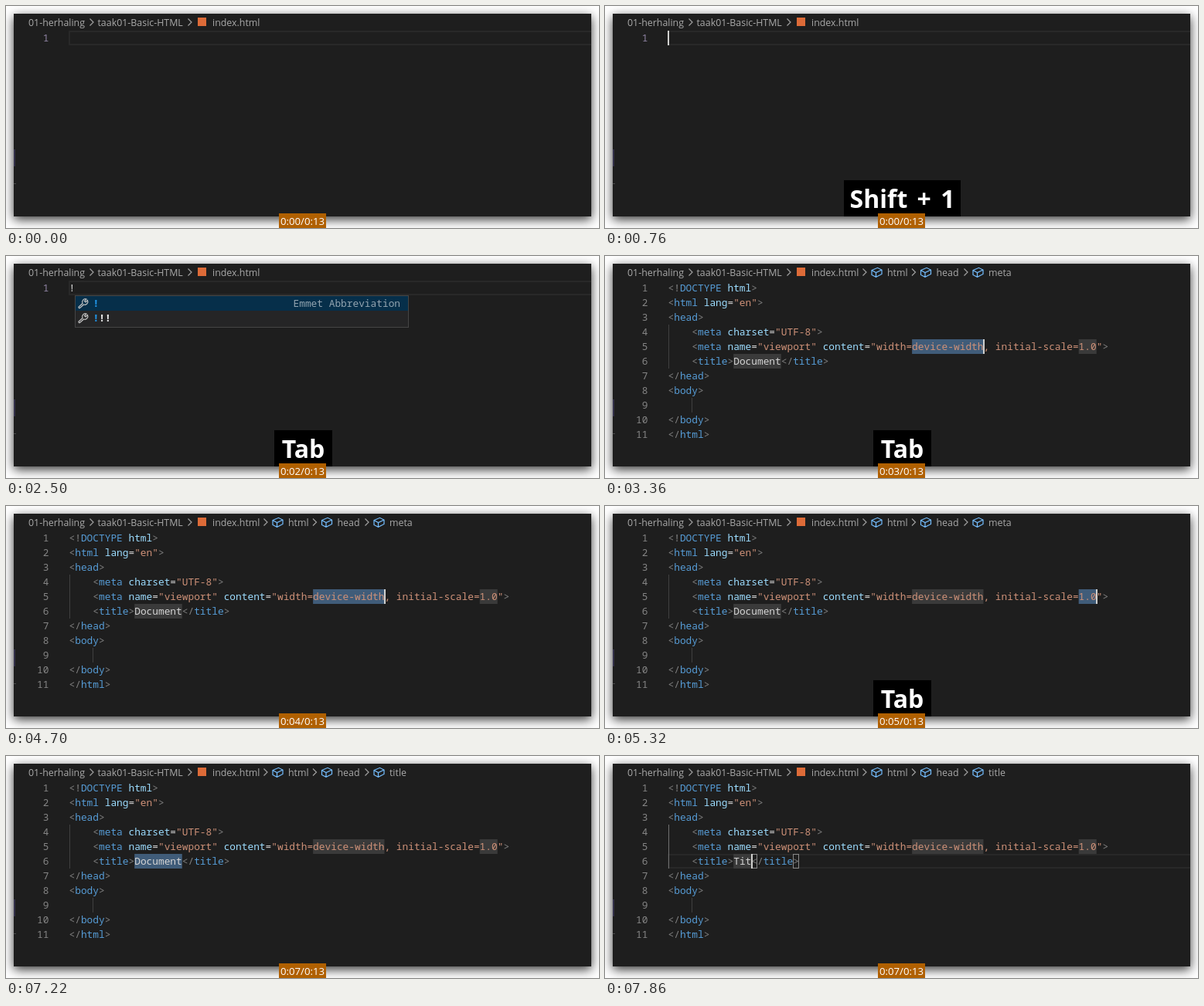
These frames come from a looping animation (767 by 288 pixels, 8000 ms). An HTML page with a canvas:

```html
<!DOCTYPE html>
<html lang="en">
<head>
<meta charset="UTF-8">
<title>Editor demo</title>
<style>
html, body { margin: 0; width: 100%; height: 100%; overflow: hidden; background: #fff; }
canvas { display: block; }
</style>
</head>
<body>
<canvas id="stage" width="767" height="288"></canvas>
<script>
const ctx = document.getElementById('stage').getContext('2d');
const LOOP = 8000, X = 81.5, CW = 7.698, ROW = 19;
const MONO = '12.83px "Noto Sans Mono", "DejaVu Sans Mono", monospace';
const UI = '"Open Sans", "Noto Sans", sans-serif';
const WRENCH = new Path2D('M13.5 4L11 6.5 9.5 5 12 2.5A4 4 0 0 0 7 8L2 12.5A1.2 1.2 0 0 0 3.5 14L8.5 9.5A4 4 0 0 0 13.5 4Z');
const CUBE = new Path2D('M1.5 5L9 1.8 14.5 4.5V10L7 13.8 1.5 11ZM1.5 5L7 8 14.5 4.5M7 8V13.8');

// moments of the story, in ms
const TYPED = 930, POPUP = 1300, EXPAND = 2580, CRUMBS = 3360,
      STOP2 = 5320, STOP3 = 6290, IN_TITLE = 6440, EDIT = 7540;
const keys = [[760, 2200, 'Shift + 1'], [2200, 3670, 'Tab'], [4780, 7220, 'Tab']];
// caret: start, end of fade-out, column, row, fade-in time
const carets = [[380, 1200, 0, 1, 0], [TYPED, 2110, 1, 1, 0], [EXPAND, 3830, 53, 5, 0],
  [4230, 4860, 53, 5, 170], [STOP2, 6130, 72, 5, 0], [STOP3, 7080, 19, 6, 0],
  [EDIT, 9000, 12, 6, 0], [7690, 9000, 13, 6, 0], [7860, 9000, 14, 6, 0]];

const colX = col => X + col * CW;
const rowY = row => 32 + (row - 1) * ROW;

function box(x, y, w, h, color) {
  ctx.fillStyle = color;
  ctx.fillRect(x, y, w, h);
}

function text(s, x, y, color, font = MONO, align = 'left') {
  ctx.font = font;
  ctx.textAlign = align;
  ctx.fillStyle = color;
  ctx.fillText(s, x, y);
}

function icon(path, x, y, color) {
  ctx.save();
  ctx.translate(x, y);
  ctx.strokeStyle = color;
  ctx.lineWidth = 1.2;
  ctx.stroke(path);
  ctx.restore();
}

function frame(x, y, w, h, color, line) {
  ctx.strokeStyle = color;
  ctx.lineWidth = line;
  ctx.strokeRect(x, y, w, h);
}

function codeLine(s, row) {
  const token = /(<[!\/]?|>)|("[^"]*")|((?<=<[!\/]?)\w+)|((?<= )\w+(?=[=>]))|[^<>"]/g;
  const colors = ['#808080', '#ce9178', '#569cd6', '#9cdcfe'];
  for (const m of s.matchAll(token)) {
    const kind = m.slice(1).findIndex(Boolean);
    text(m[0], colX(m.index), rowY(row) + 14, colors[kind] || '#d4d4d4');
  }
}

function lineNumber(n, color) {
  text(n, 55.5, rowY(n) + 14, color, MONO, 'right');
}

function currentLine(row) {
  frame(82, rowY(row) + 1, 690, 17, '#282828', 2);
}

function mark(col, len, row, selected) {
  box(colX(col), rowY(row), len * CW, ROW, selected ? '#405c79' : '#3a3a3a');
}

function editor() {
  box(0, 0, 767, 288, '#fff');
  ctx.save();
  ctx.shadowColor = 'rgba(0,0,0,.8)';
  ctx.shadowBlur = 13;
  ctx.shadowOffsetY = 4;
  box(10, 10, 747, 263, '#1e1e1e');
  ctx.restore();
  box(10, 186, 2, 22, '#34314a');
  box(10, 230, 3, 1, '#4a4a4a');
}

function chevron(x) {
  ctx.beginPath();
  ctx.moveTo(x, 16.5);
  ctx.lineTo(x + 4.5, 21);
  ctx.lineTo(x, 25.5);
  ctx.strokeStyle = '#a0a0a0';
  ctx.lineWidth = 1.2;
  ctx.stroke();
}

function breadcrumbs(t) {
  const label = (s, x) => text(s, x, 26, '#a9a9a9', '12.4px ' + UI);
  label('01-herhaling', 29);
  chevron(108.5);
  label('taak01-Basic-HTML', 118.5);
  chevron(235.5);
  box(248, 15, 11, 11, '#dd6b38');
  label('index.html', 267);
  if (t < CRUMBS) return;
  const path = ['html', 'head', t < IN_TITLE ? 'meta' : 'title'];
  [365, 428.5, 496].forEach((x, i) => {
    chevron(x - 31.5);
    icon(CUBE, x - 21.5, 13.5, '#75beff');
    label(path[i], x);
  });
}

function popup() {
  box(89, 51, 432, 42, '#252526');
  box(90, 52, 430, 19, '#062f4a');
  frame(89.5, 51.5, 431, 41, '#454545', 1);
  const bold = 'bold ' + MONO;
  for (const y of [66, 85]) {
    icon(WRENCH, 92, y - 12.5, '#c5c5c5');
    text('!', 112.5, y, '#2196e8', bold);
  }
  text('!!', 112.5 + CW, 85, '#e8e8e8', bold);
  text('Emmet Abbreviation', 371.5, 66, '#93a4b0');
}

function start(t) {
  currentLine(1);
  lineNumber(1, '#8f83a3');
  if (t >= TYPED) text('!', X, 46, '#d4d4d4');
  if (t >= POPUP) popup();
}

function page(t) {
  const editing = t >= EDIT;
  const title = editing ? 'Tit'.slice(0, t < 7690 ? 1 : t < 7860 ? 2 : 3) : 'Document';
  const lines = ['<!DOCTYPE html>', '<html lang="en">', '<head>',
    '    <meta charset="UTF-8">',
    '    <meta name="viewport" content="width=device-width, initial-scale=1.0">',
    `    <title>${title}</title>`, '</head>', '<body>', '', '</body>', '</html>'];

  if (editing) currentLine(6);
  box(82, rowY(4), 1, 3 * ROW, editing ? '#707070' : '#404040');
  box(112, rowY(9), 1, ROW, '#404040');
  mark(41, 12, 5, t < STOP2);
  mark(69, 3, 5, t >= STOP2 && t < STOP3);
  mark(11, title.length, 6, t >= STOP3 && !editing);
  lines.forEach((s, i) => {
    lineNumber(i + 1, '#858585');
    codeLine(s, i + 1);
  });
  if (!editing) return;
  // matching angle brackets of the closing tag
  for (const col of [11 + title.length, 18 + title.length])
    frame(Math.floor(colX(col)) + .5, rowY(6) + .5, 7, 18, '#888', 1);
}

function caret(t) {
  const c = carets.findLast(c => t >= c[0]);
  if (!c) return;
  const [from, to, col, row, fadeIn] = c;
  const alpha = Math.min(1, (to - t) / 160, fadeIn ? (t - from) / fadeIn : 1);
  ctx.globalAlpha = Math.max(0, alpha);
  box(Math.floor(colX(col)), rowY(row), 2, ROW, '#d0d0ce');
  ctx.globalAlpha = 1;
}

function keyLabel(t) {
  const key = keys.find(([from, to]) => t >= from && t < to);
  if (!key) return;
  const w = key[2] === 'Tab' ? 75 : 151;
  box(Math.round(384.5 - w / 2), 226, w, 47, '#000');
  ctx.wordSpacing = '4px';
  text(key[2], 384.5, 262, '#fff', 'bold 32px ' + UI, 'center');
  ctx.wordSpacing = '0px';
}

function timer(t) {
  const sec = Math.min(7, Math.floor((t + 60) / 1000));
  box(353, 269, 61, 19, '#b06000');
  text(`0:0${sec}/0:13`, 383.5, 284, '#fff', '13.2px ' + UI, 'center');
}

function draw(now) {
  const t = now % LOOP;
  editor();
  ctx.save();
  ctx.beginPath();
  ctx.rect(10, 10, 747, 263);
  ctx.clip();
  breadcrumbs(t);
  (t < EXPAND ? start : page)(t);
  caret(t);
  keyLabel(t);
  ctx.restore();
  timer(t);
}

let begin;
function tick(now) {
  begin ??= now;
  draw(now - begin);
  requestAnimationFrame(tick);
}
requestAnimationFrame(tick);
</script>
</body>
</html>
```
